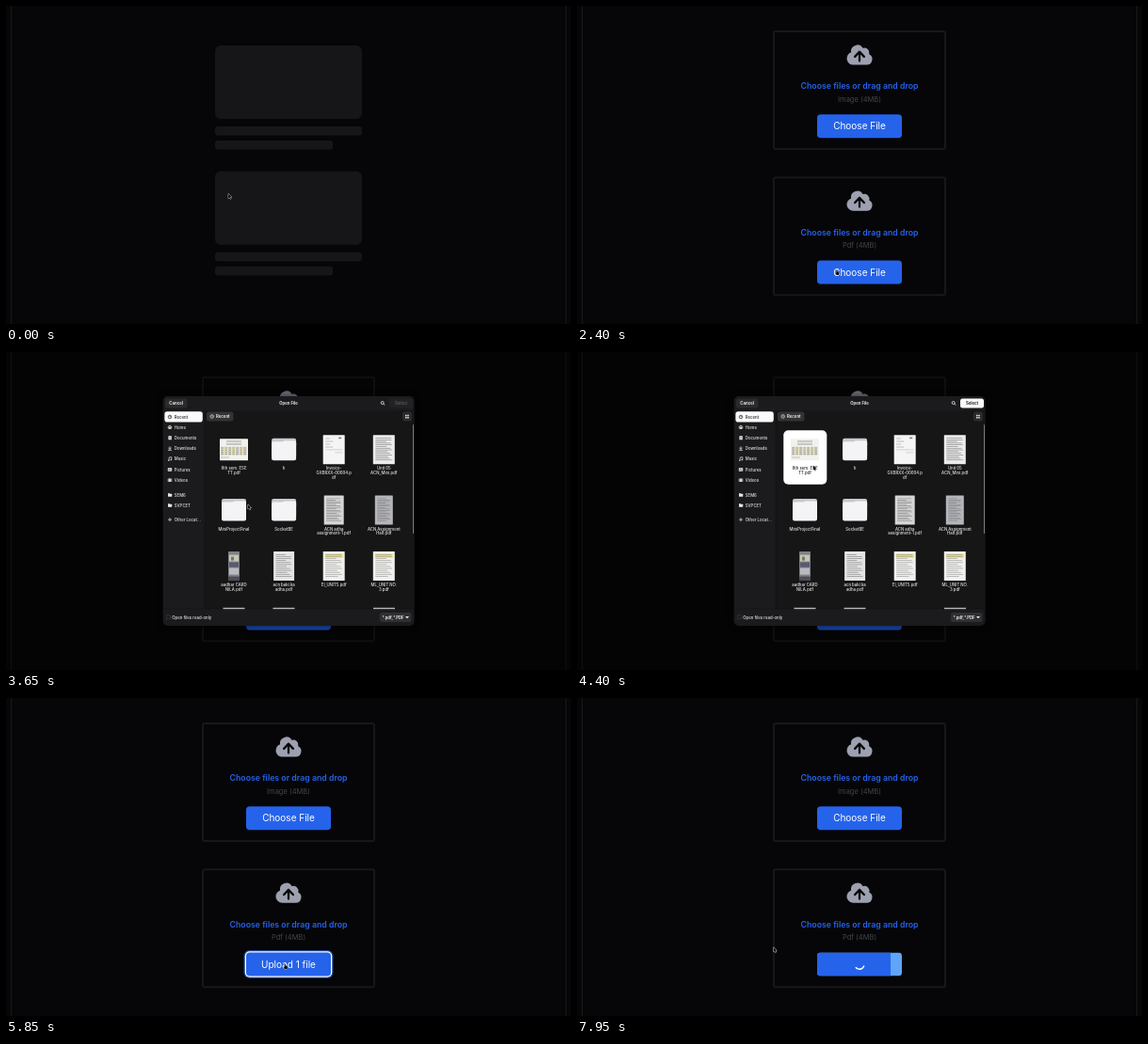
These frames come from a looping animation (600 by 338 pixels, 8000 ms). An HTML page with a canvas:

```html
<!DOCTYPE html>
<html lang="en">
<head>
<meta charset="utf-8">
<title>File upload</title>
<style>
  html, body { margin: 0; width: 100%; height: 100%; overflow: hidden; background: #060608; }
  canvas { display: block; width: 600px; height: 338px; }
</style>
</head>
<body>
<canvas id="stage"></canvas>
<script>
const W = 600, H = 338, LOOP = 8000, STEP = 50;
const canvas = document.getElementById('stage');
const c = canvas.getContext('2d');
const dpr = window.devicePixelRatio || 1;
canvas.width = W * dpr;
canvas.height = H * dpr;

const BLUE = '#2563eb', LIGHT = '#60a5fa';
const CLOUD = new Path2D('M5.5 17a4.5 4.5 0 0 1-1.44-8.765a4.5 4.5 0 0 1 8.302-3.046a3.5 3.5 0 0 1 4.504 4.272A4 4 0 0 1 15 17H5.5Zm3.75-2.75a.75.75 0 0 0 1.5 0V9.66l1.95 2.1a.75.75 0 1 0 1.1-1.02l-3.25-3.5a.75.75 0 0 0-1.1 0l-3.25 3.5a.75.75 0 1 0 1.1 1.02l1.95-2.1v4.59Z');

const clamp = (v, a, b) => Math.min(b, Math.max(a, v));
const ramp = (t, a, b) => clamp((t - a) / (b - a), 0, 1);
const smooth = p => p * p * (3 - 2 * p);
const mix = (a, b, p) => a + (b - a) * p;

// CSS cubic-bezier(.4, 0, .2, 1)
function ease(x) {
  let lo = 0, hi = 1;
  for (let i = 0; i < 20; i++) {
    const s = (lo + hi) / 2, r = 1 - s;
    if (1.2 * r * r * s + 0.6 * r * s * s + s * s * s < x) lo = s; else hi = s;
  }
  return 3 * (1 - lo) * lo * lo + lo ** 3;
}

function box(x, y, w, h, r, fill) {
  c.fillStyle = fill;
  c.beginPath();
  c.roundRect(x, y, w, h, r);
  c.fill();
}

function text(str, x, y, size, fill, weight = 400, align = 'center') {
  c.font = `${weight} ${size}px Inter, sans-serif`;
  c.textAlign = align;
  c.textBaseline = 'alphabetic';
  c.fillStyle = fill;
  c.fillText(str, x, y + size * 0.36);
}

function line(color, width, ...pts) {
  c.strokeStyle = color;
  c.lineWidth = width;
  c.beginPath();
  for (let i = 0; i < pts.length; i += 2) c.lineTo(pts[i], pts[i + 1]);
  c.stroke();
}

function ring(x, y, r, color, width, from = 0, to = 7) {
  c.strokeStyle = color;
  c.lineWidth = width;
  c.beginPath();
  c.arc(x, y, r, from, to);
  c.stroke();
}

/* Page */

function skeleton(y) {
  const fill = '#161618';
  box(222, y, 156, 78, 6, fill);
  box(222, y + 86, 156, 9.6, 3, fill);
  box(222, y + 101, 125, 9.6, 3, fill);
}

function uploader(y, kind, button) {
  c.strokeStyle = '#17171a';
  c.lineWidth = 2;
  c.beginPath();
  c.roundRect(209, y + 1, 182, 125, 2);
  c.stroke();
  c.save();
  c.translate(285, y + 11);
  c.scale(1.5, 1.5);
  c.fillStyle = '#9ca0af';
  c.fill(CLOUD, 'evenodd');
  c.restore();
  text('Choose files or drag and drop', 300, y + 59.2, 8.75, BLUE, 600);
  text(kind + ' (4MB)', 300, y + 73, 7.5, '#42454c');
  button(y + 89.3);
}

function plainButton(label) {
  return y => {
    box(255, y, 90, 25, 3.75, BLUE);
    text(label, 300, y + 12.5, 10, '#fff');
  };
}

function focusedButton(y) {
  box(252.5, y - 2.5, 95, 30, 6, '#1f4387');
  box(253.75, y - 1.25, 92.5, 27.5, 5, '#fff');
  plainButton('Upload 1 file')(y);
}

function busyButton(t) {
  return y => {
    c.save();
    c.beginPath();
    c.roundRect(255, y, 90, 25, 3.75);
    c.clip();
    box(255, y, 90, 25, 0, LIGHT);
    box(255, y, 81 * ease(ramp(t, 7570, 8070)), 25, 0, BLUE);
    c.restore();
    const left = [[5900, 6050], [6300, 6450], [7450, 7950]]
      .reduce((sum, [a, b]) => sum + b - clamp(t, a, b), 0);
    const start = (20 - left * 0.36) * Math.PI / 180;
    c.lineCap = 'round';
    ring(300, y + 12.8, 4.9, '#fff', 1.4, start, start + Math.PI * 2 / 3);
    c.lineCap = 'butt';
  };
}

function page(t) {
  box(0, 0, W, H, 0, '#060608');
  box(5, 0, 1.2, H, 0, '#17171a');
  box(594, 0, 1.2, H, 0, '#17171a');
  if (t < 1700) {
    skeleton(42);
    skeleton(175.7);
    return;
  }
  uploader(26, 'Image', plainButton('Choose File'));
  uploader(181.2, 'Pdf',
    t < 4750 ? plainButton('Choose File') :
    t < 5850 ? plainButton('Upload 1 file') :
    t < 5950 ? focusedButton : busyButton(t));
}

/* Open File dialog */

function clock(x, y, color) {
  ring(x, y, 1.8, color, 0.7);
  line(color, 0.6, x, y - 1, x, y, x + 0.8, y);
}

function smallFolder(x, y, color) {
  box(x - 2, y - 1.8, 2, 1.4, 0.4, color);
  box(x - 2, y - 1.2, 4.2, 3, 0.4, color);
}

const PLACES = [
  ['Recent', 69, (y) => clock(174, y, '#222')],
  ['Home', 80, (y, k) => { line(k, 0.8, 171.6, y, 174, y - 2, 176.4, y); box(172.4, y - 0.4, 3.2, 2.2, 0, k); }],
  ['Documents', 91.2, (y, k) => { box(172.4, y - 2, 3.4, 4, 0.5, k); line('#222', 0.5, 173.2, y, 175, y); }],
  ['Downloads', 102.4, (y, k) => { line(k, 0.8, 174, y - 2, 174, y + 1); line(k, 0.8, 172.4, y - 0.4, 174, y + 1, 175.6, y - 0.4); line(k, 0.7, 172, y + 2, 176, y + 2); }],
  ['Music', 113.7, (y, k) => { line(k, 0.7, 173.2, y + 1.3, 173.2, y - 1.7, 175.8, y - 2, 175.8, y + 0.8); box(172, y + 0.8, 1.5, 1.3, 0.6, k); box(174.5, y + 0.3, 1.5, 1.3, 0.6, k); }],
  ['Pictures', 125, (y, k) => { box(171.8, y - 1.8, 4.4, 3.6, 0.5, k); line('#222', 0.6, 172.5, y + 1, 173.6, y - 0.4, 175.5, y + 1); }],
  ['Videos', 136.3, (y, k) => { box(171.8, y - 1.8, 4.4, 3.6, 0.5, k); line('#222', 0.5, 172.7, y - 1.8, 172.7, y + 1.8); line('#222', 0.5, 175.3, y - 1.8, 175.3, y + 1.8); }],
  ['SEM6', 152, (y, k) => smallFolder(174, y, k)],
  ['SVPCET', 163, (y, k) => smallFolder(174, y, k)],
  ['Other Locat…', 178.2, (y, k) => { line(k, 0.7, 172, y, 176, y); line(k, 0.7, 174, y - 2, 174, y + 2); }]
];

function folder(x, y) {
  box(x - 13, y - 12, 26, 20, 2, '#c9c9cd');
  box(x - 13, y - 8.5, 26, 20, 2, '#f4f4f6');
  box(x - 1, y - 9.5, 14, 6, 1.5, '#f4f4f6');
}

// A page thumbnail: paper, text rows, optional highlight
function sheet(w, h, rows, paper = '#ececec', ink = '#8d8d90', mark) {
  return (x, y) => {
    const l = x - w / 2, top = y - h / 2;
    box(l, top, w, h, 0.5, paper);
    if (mark) box(l + 2, top + 2.5, w - 4, 4, 0, mark);
    for (let i = 0; i < rows; i++) {
      const len = (w - 5) * (0.6 + 0.4 * Math.abs(Math.sin(i * 7.3 + w)));
      box(l + 2.5, top + 3 + i * (h - 6) / rows, len, 0.7, 0, ink);
    }
  };
}

function timetable(x, y) {
  box(x - 15, y - 11.5, 30, 23, 0.5, '#f1f1ee');
  for (let i = 0; i < 4; i++) box(x - 8, y - 9.5 + i * 1.4, 16, 0.5, 0, '#999');
  for (let i = 0; i < 7; i++) {
    box(x - 14 + i * 4, y - 3, 3.4, 9, 0, i % 2 ? '#ddd8ae' : '#cfcfc8');
    for (let j = 0; j < 4; j++) box(x - 13.5 + i * 4, y - 2 + j * 2.2, 2.4, 0.6, 0, '#8c8a70');
  }
  box(x - 14, y + 8, 9, 0.6, 0, '#999');
}

function invoice(x, y) {
  box(x - 11.5, y - 15.5, 23, 31, 0.5, '#f5f5f5');
  for (let i = 0; i < 4; i++) box(x - 9, y - 12 + i * 3, 5 + i % 2 * 3, 0.6, 0, '#999');
  box(x + 5, y - 13, 3, 1.5, 0, '#777');
  box(x - 9, y, 18, 0.5, 0, '#aaa');
  box(x + 1, y + 3, 8, 0.5, 0, '#aaa');
}

function card(x, y) {
  box(x - 6, y - 15.5, 12, 31, 0.5, '#7f8088');
  box(x - 5, y - 12, 10, 7, 0, '#c5c6b4');
  box(x - 5, y - 4, 10, 5, 0, '#595a70');
  box(x - 5, y + 2, 10, 7, 0, '#b9bac0');
  box(x - 6, y + 11, 12, 4.5, 0, '#4d4e58');
  box(x - 3, y - 10, 3, 4, 0, '#77795f');
}

const YELLOW = '#e9df55';
const FILES = [
  [['8th sem. ESE', 'TT.pdf'], timetable],
  [['h'], folder],
  [['Invoice-', 'GXBRXX-00004.p', 'df'], invoice],
  [['Unit 05', 'ACN_Mini.pdf'], sheet(23, 31, 14)],
  [['MiniProjectFinal'], folder],
  [['SocketBE'], folder],
  [['ACN adha', 'assignment-1.pdf'], sheet(21, 31, 16, '#d6d6d6')],
  [['ACN Assignment', 'Half.pdf'], sheet(19, 31, 16, '#b5b6ba', '#85868c')],
  [['aadhar CARD', 'NILA.pdf'], card],
  [['acn baki ka', 'adha.pdf'], sheet(22, 31, 12, '#e4e4e4')],
  [['EI_UNIT5.pdf'], sheet(23, 31, 12, '#f0f0ee', '#a3a3a0', YELLOW)],
  [['ML_UNIT NO.', '3.pdf'], sheet(23, 31, 12, '#f0f0ee', '#a3a3a0', YELLOW)]
];

function files(t) {
  const hover = ramp(t, 3650, 3750), pick = ramp(t, 3850, 4000);
  if (hover) box(219.3, 83.3, 46, 57.4, 5, `rgba(255,255,255,${mix(0.07 * hover, 1, pick)})`);
  FILES.forEach(([label, draw], i) => {
    const x = 242 + i % 4 * 53.1, row = Math.floor(i / 4);
    const y = [103.7, 168, 227.6][row];
    draw(x, y);
    const ink = i === 0 && pick > 0.5 ? '#222' : '#e4e4e4';
    label.forEach((s, j) => text(s, x, y + 20 + j * 4.8, 4.3, ink, 500));
  });
  for (const x of [242, 295, 401.5]) box(x - 11.5, 271.8, 23, 1.4, 0, '#b8b8b8');
}

function dialog(t) {
  const grow = t < 4000 ? smooth(ramp(t, 2800, 2950)) : 1 - smooth(ramp(t, 4430, 4550));
  if (!grow) return;
  const ink = '#e6e6e6', side = '#1b1b1d', chosen = t >= 3900;
  c.save();
  c.translate(0, 169);
  c.scale(1, grow);
  c.translate(0, -169);
  c.save();
  c.shadowColor = 'rgba(0,0,0,.5)';
  c.shadowBlur = 7 * dpr;
  box(166.7, 47, 266.8, 244, 5, side);
  c.restore();
  box(211, 62, 222.5, 211, 0, '#161617');
  line('#111112', 0.6, 211, 62, 211, 273);
  line('#111112', 0.6, 167, 273, 433.5, 273);

  box(169, 49.6, 23.5, 10, 2.5, '#2b2b2d');
  text('Cancel', 180.6, 54.6, 4.3, ink, 700);
  text('Open File', 300, 54.6, 4.3, ink, 700);
  ring(399.7, 54, 1.5, ink, 0.8);
  line(ink, 0.9, 400.8, 55.1, 402.2, 56.5);
  box(407, 49.6, 25, 10, 2.5, chosen ? '#fafafa' : '#222224');
  text('Select', 419.5, 54.6, 4.3, chosen ? '#222' : '#58585a', 700);

  box(168.4, 63.3, 40.4, 11.2, 2.8, '#fafafa');
  PLACES.forEach(([name, y, icon], i) => {
    const k = i ? ink : '#222';
    icon(y, k);
    text(name, 178.8, y, 4.3, k, 500, 'left');
  });

  box(213, 63.6, 28.5, 9.8, 2.5, '#333335');
  clock(218.7, 68.5, ink);
  text('Recent', 223, 68.6, 4.3, ink, 700, 'left');
  box(421, 63.6, 10, 9.8, 2.5, '#2b2b2d');
  for (const y of [66.7, 68.9]) for (const x of [424, 426.2]) box(x, y, 1.6, 1.6, 0.3, ink);

  files(t);
  const bar = ramp(t, 3450, 3600);
  if (bar) box(432, 77, 1, 116, 0.5, `rgba(190,190,190,${0.6 * bar})`);

  c.strokeStyle = '#3a3a3c';
  c.lineWidth = 0.6;
  c.strokeRect(170.6, 279.8, 4, 4);
  text('Open files read-only', 176.3, 282, 4.3, ink, 500, 'left');
  box(396.8, 277, 33.5, 10, 2.5, '#303032');
  text('*.pdf,*.PDF', 411, 282.1, 4.3, ink, 700);
  c.fillStyle = ink;
  c.beginPath();
  c.moveTo(424, 281);
  c.lineTo(428, 281);
  c.lineTo(426, 283.3);
  c.fill();
  c.restore();
}

/* Pointer */

// [start, end, x, y]
const MOVES = [
  [0, 150, 238, 205], [550, 700, 239.5, 247.5], [1200, 1250, 240, 248],
  [2000, 2400, 274, 280], [3450, 3750, 250.5, 120.3],
  [4850, 5700, 294.5, 282.3], [6300, 6450, 208.3, 264.5]
];

function pointer(t) {
  let x = 235.8, y = 199.2;
  for (const [a, b, nx, ny] of MOVES) {
    const p = smooth(ramp(t, a, b));
    x = mix(x, nx, p);
    y = mix(y, ny, p);
  }
  const onPage = t < 2850 || t > 4550;
  const hand = onPage && (t > 2300 && t < 6350);
  c.save();
  c.translate(x, y);
  c.lineJoin = 'round';
  c.beginPath();
  const shape = hand
    ? [1.4, 0.5, 2.2, 0.5, 2.3, 2.3, 4.3, 2.8, 4.2, 5.2, 3.6, 6, 1.7, 6, 0.3, 3.8, 0.6, 3.2, 1.4, 3.8]
    : [0.4, 0.5, 0.4, 5.2, 1.5, 4.2, 2.3, 6, 3.1, 5.6, 2.4, 3.9, 3.8, 3.8];
  for (let i = 0; i < shape.length; i += 2) c.lineTo(shape[i], shape[i + 1]);
  c.closePath();
  c.strokeStyle = '#d8d8d8';
  c.lineWidth = 0.9;
  c.stroke();
  c.fillStyle = '#0a0a0a';
  c.fill();
  c.restore();
}

function draw(t) {
  c.setTransform(dpr, 0, 0, dpr, 0, 0);
  page(t);
  const dim = 0.35 * (ramp(t, 2800, 3350) - ramp(t, 4430, 4720));
  if (dim > 0) box(0, 0, W, H, 0, `rgba(0,0,0,${dim})`);
  dialog(t);
  pointer(t);
}

const begin = performance.now();
function tick() {
  const t = (performance.now() - begin) % LOOP;
  draw(Math.floor(t / STEP) * STEP);
  requestAnimationFrame(tick);
}
tick();
</script>
</body>
</html>
```
